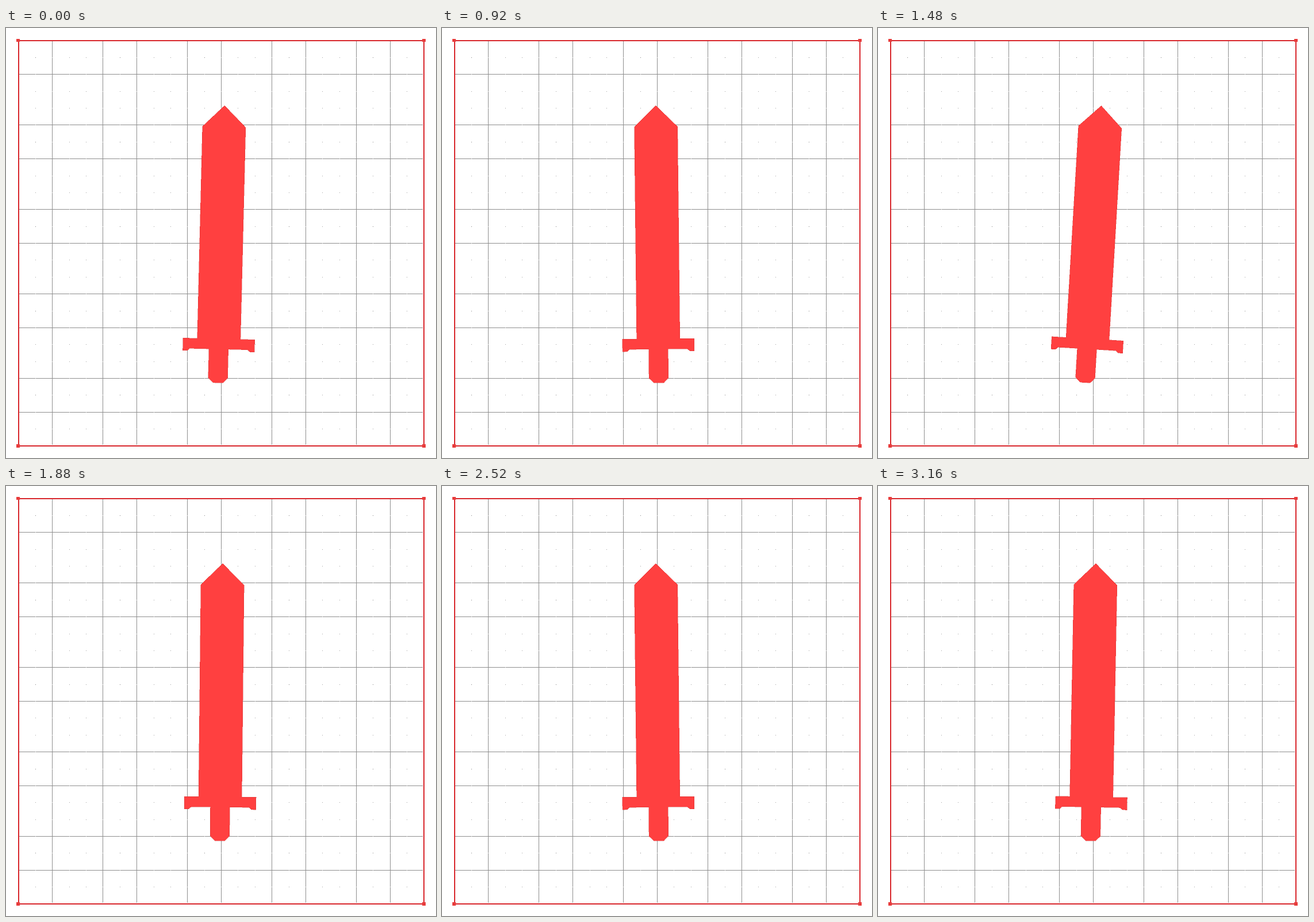
An HTML page that plays this animation: 748x748 px, repeating every 3200 ms.

```html
<!DOCTYPE html>
<html lang="en">
<head>
<meta charset="utf-8">
<title>Swaying sword</title>
<style>
  html, body { margin: 0; width: 100%; height: 100%; overflow: hidden; background: #fff; }
  svg { display: block; width: 100vw; height: 100vh; shape-rendering: crispEdges; }
</style>
</head>
<body>
<svg viewBox="0 0 748 748">
  <g id="grid"></g>
  <g id="frame">
    <rect x="21.5" y="21.5" width="705" height="705" fill="none" stroke="#d8262c" stroke-width="2"/>
    <g fill="#e83c3c">
      <rect x="18" y="19" width="6" height="5"/>
      <rect x="724" y="19" width="6" height="5"/>
      <rect x="18" y="724" width="6" height="6"/>
      <rect x="724" y="724" width="6" height="6"/>
    </g>
  </g>
  <path id="sword" fill="#ff4040" stroke="#c83434" stroke-width=".4"
    d="M374.4 134.8 L412 172 V540.8 H436.8 V562.4 H429 L424.5 558.6 H391.3 V609
       L383.3 617.2 H366 L357.5 609 V558.6 H324 L320 562.4 H312 V540.8 H336.8 V172 Z"/>
</svg>
<script>
  const grid = document.getElementById('grid');
  const sword = document.getElementById('sword');

  function box(x, y, w, h, fill) {
    const r = document.createElementNS('http://www.w3.org/2000/svg', 'rect');
    Object.entries({ x, y, width: w, height: h, fill }).forEach(([k, v]) => r.setAttribute(k, v));
    grid.append(r);
  }

  // Of 24 divisions, some are full lines; the rest show only as dots.
  const at = i => Math.floor(22 + i * 29.38);
  const units = Array.from({ length: 23 }, (_, i) => i + 1);
  const isLine = i => i % 5 === 0 || i % 5 === 2;
  const lines = units.filter(isLine);
  const faint = units.filter(i => !isLine(i));

  for (const i of lines) {
    box(at(i), 22, 1, 703, '#8e8e8e');
    box(22, at(i), 703, 1, '#8e8e8e');
  }
  for (const i of faint) {
    for (const j of lines) {
      box(at(j), at(i), 1, 1, '#d4d4d4');
      box(at(i), at(j), 1, 1, '#d4d4d4');
    }
    for (const j of faint) {
      const strong = i % 5 === 1 && j % 5 === 1;
      box(at(i), at(j), 1, 1, strong ? '#808080' : '#a0a0a0');
    }
  }

  // Turning points as [step, degrees]: an even sway with one strong shake.
  const STEP = 40, COUNT = 80, HIGH = 1.4, LOW = -1.7;
  const sway = (from, to) => {
    const keys = [];
    for (let k = from; k <= to; k += 5) keys.push([k, k % 10 ? LOW : HIGH]);
    return keys;
  };
  const keys = [
    ...sway(0, 30),
    [33.6, -3], [38.6, 5.3], [43.65, -4.9], [48.65, 2.4],
    ...sway(55, 80)
  ];

  function angle(k) {
    const n = keys.findIndex(key => key[0] > k);
    const [a, from] = keys[n - 1], [b, to] = keys[n];
    return from + (to - from) * (1 - Math.cos(Math.PI * (k - a) / (b - a))) / 2;
  }

  function draw() {
    const k = Math.floor(performance.now() / STEP) % COUNT;
    sword.setAttribute('transform', `rotate(${angle(k).toFixed(3)} 374 374)`);
    requestAnimationFrame(draw);
  }
  draw();
</script>
</body>
</html>
```
